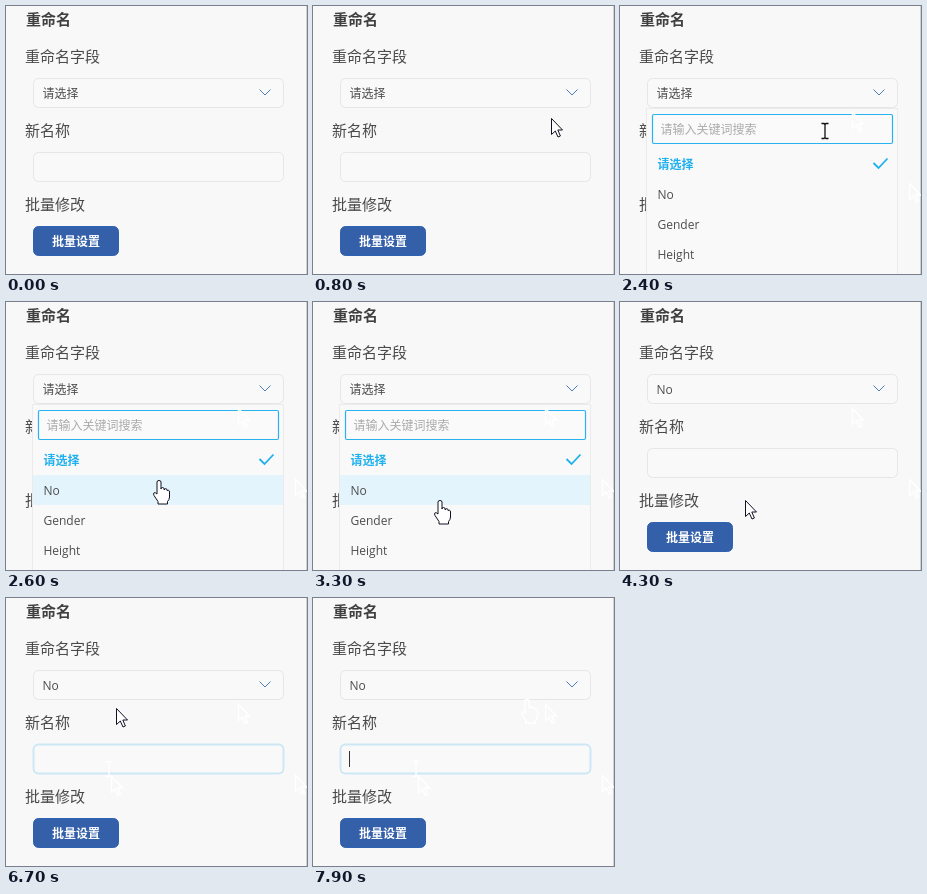
These frames come from a looping animation (301x268 px, 8000 ms). An HTML page:

```html
<!DOCTYPE html>
<html lang="zh-CN">
<head>
<meta charset="utf-8">
<style>
html, body { margin: 0; width: 100%; height: 100%; overflow: hidden; background: #f8f8f8; }
svg { display: block; width: 301px; height: 268px; }
text { font: 12px "Open Sans", "Noto Sans CJK SC", "Noto Sans CJK", sans-serif; fill: #4d4d4d; }
.label { font-size: 15px; fill: #4a4a4a; }
.title { font-size: 15px; font-weight: 600; fill: #404040; }
.field { fill: #f9f9f9; stroke: #e6e6e6; }
.caret { stroke: #333; }
.ghost { fill: none; stroke: #fff; stroke-width: 1.4; }
#arrow, #hand { fill: #fff; stroke: #112; stroke-width: 1; stroke-linejoin: round; }
#beam { stroke: #111; stroke-width: 1.3; }
</style>
</head>
<body>
<svg viewBox="0 0 301 268">
  <defs>
    <path id="arrowShape" d="M.5 .5V16.5L4.3 13L7 19L9.4 18L6.8 12H11.5Z"/>
    <path id="handShape" d="M-2 14V2Q-2 .5 0 .5T2 2V9Q2 7.5 3.5 7.5T5.2 9V10Q5.4 8.5 6.8 8.7T8.2 10.3V11Q8.6 10 9.6 10.3T10.5 12V17Q10.5 19.5 8.5 21.5V24H-1V21.5L-5 15.5Q-6 13.5 -5 12.8Q-3.8 12.2 -2 14Z"/>
    <path id="beamShape" fill="none" d="M-3.5 -7.5H-1L0 -6.5L1 -7.5H3.5M0 -6.5V6.5M-3.5 7.5H-1L0 6.5L1 7.5H3.5"/>
  </defs>
  <rect width="301" height="268" fill="#f8f8f8"/>
  <path d="M300.5 0V268" stroke="#d2d2d2"/>

  <text class="title" x="20" y="18.5">重命名</text>
  <text class="label" x="19" y="55.5">重命名字段</text>
  <rect class="field" x="27.5" y="72.5" width="250" height="29" rx="5"/>
  <text id="choice" x="36.5" y="91.5">请选择</text>
  <path d="M253.5 83.5L259 89L264.5 83.5" fill="none" stroke="#4a7fb8"/>
  <text class="label" x="19" y="129.5">新名称</text>
  <rect id="input" class="field" x="27.5" y="146.5" width="250" height="29" rx="5"/>
  <path id="inputCaret" class="caret" d="M36.5 153V169"/>
  <text class="label" x="19" y="203.5">批量修改</text>
  <rect x="27.5" y="220.5" width="85" height="29" rx="5" fill="#345fa9" stroke="#2f62b3"/>
  <text x="46" y="240" style="fill:#fff;font-weight:600">批量设置</text>

  <g id="panel">
    <rect x="26.5" y="102.5" width="251" height="180" fill="#f9f9f9" stroke="#ebebeb"/>
    <rect x="32.5" y="108.5" width="240" height="29" rx="1.5" fill="#fafafa" stroke="#29b2f0" stroke-width="1.2"/>
    <path id="searchCaret" class="caret" d="M41.5 115V131"/>
    <text x="40.5" y="128" style="fill:#aaa">请输入关键词搜索</text>
    <rect id="hover" x="27" y="173" width="250" height="30" fill="#e3f4fd"/>
    <text x="37.5" y="162.5" style="fill:#1fb0ef;font-weight:600">请选择</text>
    <path d="M253.5 157L258.5 162L267.5 152.5" fill="none" stroke="#1fb0ef" stroke-width="1.8"/>
    <text x="37.5" y="193">No</text>
    <text x="37.5" y="223">Gender</text>
    <text x="37.5" y="253">Height</text>
  </g>

  <g class="ghost">
    <use href="#arrowShape" x="289" y="177" data-from="1100"/>
    <use href="#arrowShape" x="232" y="106" data-from="2300"/>
    <use href="#arrowShape" x="105" y="178" data-from="5100"/>
    <use href="#beamShape" x="103" y="171" data-from="5500"/>
    <use href="#handShape" x="214" y="101" data-from="7400"/>
  </g>

  <g id="cursor">
    <use id="arrow" href="#arrowShape"/>
    <use id="hand" href="#handShape"/>
    <use id="beam" href="#beamShape"/>
  </g>
</svg>
<script>
const LOOP = 8000, STEP = 100;
const $ = id => document.getElementById(id);
const show = (el, on) => { el.style.display = on ? '' : 'none'; };
const clamp = v => Math.max(0, Math.min(1, v));
const blink = (t, start) => Math.floor((t - start) / 500) % 2 === 0;

// Pointer stops: start time, shape, hotspot x, hotspot y
const stops = [
  [0, ''],
  [300, 'arrow', 264, 51], [400, 'arrow', 197, 51], [500, 'arrow', 173, 42],
  [700, 'arrow', 196, 62], [800, 'arrow', 238, 112], [900, 'arrow', 282, 150],
  [1000, 'arrow', 289, 177], [1100, 'arrow', 282, 157], [1200, 'arrow', 268, 128],
  [1300, 'hand', 252, 99], [1400, 'hand', 248, 96],
  [2100, 'arrow', 239, 101], [2200, 'arrow', 232, 106], [2300, 'beam', 213, 118],
  [2400, 'beam', 205, 125], [2500, 'hand', 178, 152], [2600, 'hand', 153, 178],
  [2700, 'hand', 137, 190], [2800, 'hand', 130, 196], [2900, 'hand', 127, 198],
  [3600, 'hand', 125, 198], [4200, 'arrow', 125, 198],
  [4900, 'arrow', 117, 191], [5000, 'arrow', 105, 178],
  [5100, 'beam', 103, 171], [5500, 'beam', 101, 163],
  [6700, 'arrow', 110, 110], [6800, 'hand', 117, 90], [6900, 'hand', 121, 80],
  [7100, 'hand', 148, 80], [7200, 'hand', 188, 91], [7300, 'hand', 214, 101],
  [7400, '']
];
const ghosts = document.querySelectorAll('[data-from]');

function render(t) {
  const [, shape, x = 0, y = 0] = stops.findLast(stop => stop[0] <= t);
  for (const name of ['arrow', 'hand', 'beam']) show($(name), name === shape);
  $('cursor').setAttribute('transform', `translate(${x} ${y})`);

  const opacity = Math.min(clamp((t - 1800) / 200), clamp((4300 - t) / 300));
  $('panel').style.opacity = opacity;
  show($('panel'), opacity > 0);
  show($('hover'), t >= 2600);
  show($('searchCaret'), blink(t, 1800));

  $('choice').textContent = t < 4100 ? '请选择' : 'No';
  const focused = t >= 5900;
  $('input').style.stroke = focused ? '#cde8f5' : '';
  $('input').style.strokeWidth = focused ? 2 : 1;
  show($('inputCaret'), focused && blink(t, 5900));
  for (const ghost of ghosts) show(ghost, t >= +ghost.dataset.from);
}

const start = performance.now();
function tick() {
  const t = (performance.now() - start) % LOOP;
  render(Math.floor(t / STEP) * STEP);
  requestAnimationFrame(tick);
}
tick();
</script>
</body>
</html>
```
